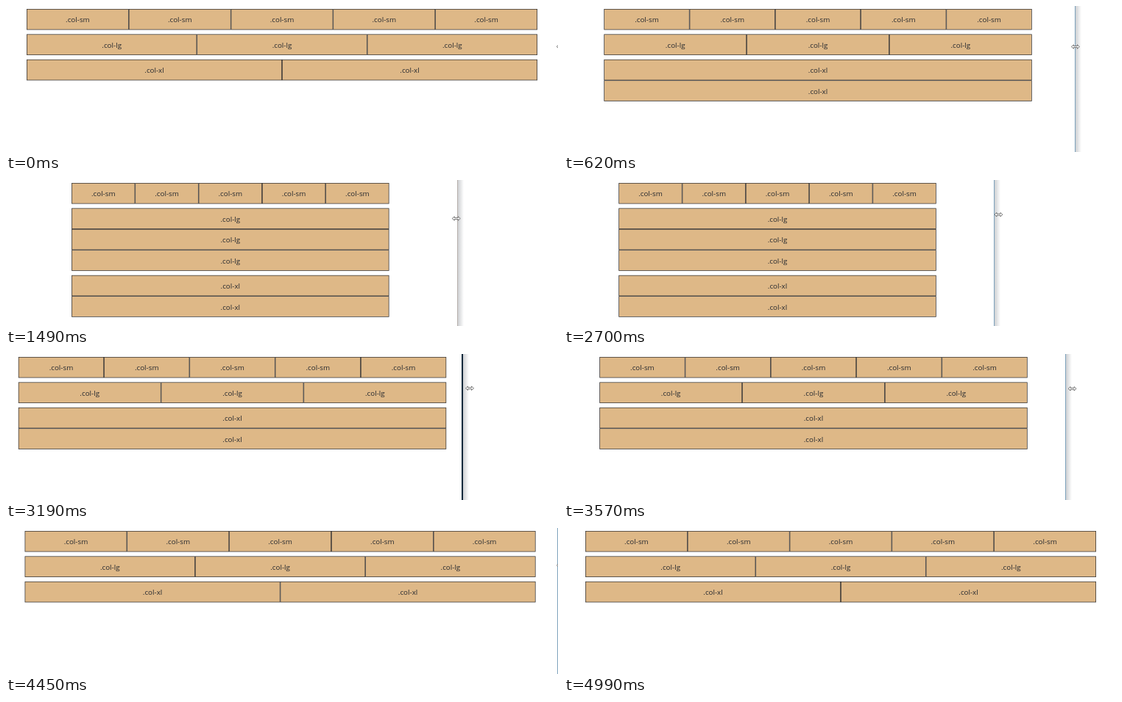
Animation, 750 px wide and 199 px high, one loop 5510 ms. Source, as an HTML page with a canvas:

```html
<!DOCTYPE html>
<html lang="en">
<head>
<meta charset="utf-8">
<title>Responsive columns</title>
<style>
html, body { margin: 0; width: 100%; height: 100%; overflow: hidden; background: #fff; }
canvas { display: block; }
</style>
</head>
<body>
<canvas id="stage" width="750" height="199"></canvas>
<script>
const ctx = document.getElementById('stage').getContext('2d');
const LOOP = 5510, STEP = 78, PAUSE = 2700, RESUME = 2791;
const ROW = 28.45, GAP = 6, BORDER = 0.7;

// Page width at the turns of the drag; ease is the ease-out power leading there.
const turns = [
  { at: 0, page: 750 },
  { at: 618, page: 690 },
  { at: 1242, page: 650 },
  { at: 1476, page: 609.6 },
  { at: 1900, page: 580, ease: 2 },
  { at: PAUSE, page: 580 },
  { at: 3181, page: 615 },
  { at: 4970, page: 752, ease: 2.5 }
];

// The drag is redrawn in steps and rests before turning back.
function snap(t) {
  const start = t < PAUSE ? -6 : RESUME;
  const stepped = start + Math.floor((t - start) / STEP) * STEP;
  return Math.max(t < PAUSE ? 0 : PAUSE, stepped);
}

function pageAt(t) {
  const i = turns.findIndex(turn => turn.at > t);
  if (i < 0) return turns[turns.length - 1].page;
  const a = turns[i - 1], b = turns[i];
  const left = (b.at - t) / (b.at - a.at);
  return b.page + (a.page - b.page) * left ** (b.ease || 1);
}

function rect(x, y, w, h, color) {
  ctx.fillStyle = color;
  ctx.fillRect(x, y, w, h);
}

function cell(label, x, y, w) {
  rect(x, y, w, ROW, '#28282b');
  rect(x + BORDER, y + BORDER, w - 2 * BORDER, ROW - 2 * BORDER, '#deb887');
  ctx.fillStyle = '#26292f';
  ctx.fillText(label, x + w / 2, y + 18.4);
}

// Draws columns side by side or stacked; returns the next top.
function group(label, count, stacked, left, width, top) {
  const w = stacked ? width : width / count;
  for (let i = 0; i < count; i++)
    cell(label, left + (stacked ? 0 : i * w), top + (stacked ? i * ROW : 0), w);
  return top + (stacked ? count : 1) * ROW + GAP;
}

// The border turns pale when pulled in fast and dark when pushed out fast.
function windowEdge(x, lead) {
  const dark = lead > 7.2;
  const width = dark ? 2 : 1;
  const color = dark ? '#10293b' : lead < -5 ? '#b9b2ae' : '#7fa3bd';
  const fade = ctx.createLinearGradient(x + width, 0, x + width + 8, 0);
  fade.addColorStop(0, 'rgba(200,202,205,0.9)');
  fade.addColorStop(1, 'rgba(200,202,205,0)');
  rect(x + width, 0, 8, 199, fade);
  rect(x, 0, width, 199, color);
}

function pointer(x, y) {
  ctx.beginPath();
  for (const side of [-1, 1])
    for (const [dx, dy] of [[2.5, 1], [2.5, 2.7], [5.5, 0], [2.5, -2.7], [2.5, -1]])
      ctx.lineTo(x + side * dx, y + side * dy);
  ctx.closePath();
  ctx.fillStyle = '#fff';
  ctx.fill();
  ctx.strokeStyle = '#555';
  ctx.lineWidth = 0.8;
  ctx.stroke();
}

function draw(t) {
  const page = pageAt(t);
  const lead = pageAt(t + 40) - page; // the pointer runs ahead of the page
  const wide = page >= 742.8, medium = page >= 612;
  const width = wide ? 694 : medium ? 581.4 : 431.4;
  const left = (page - width) / 2;

  rect(0, 0, 750, 199, '#fff');
  ctx.font = '9.8px "Open Sans", "Noto Sans", sans-serif';
  ctx.textAlign = 'center';
  let top = group('.col-sm', 5, false, left, width, 4);
  top = group('.col-lg', 3, !medium, left, width, top);
  group('.col-xl', 2, !wide, left, width, top);
  windowEdge(Math.floor(page + 4), lead);
  pointer(page + lead + 7.5, 51.2 + 4.5 * Math.cos((t - 350) / LOOP * 2 * Math.PI));
}

function tick() {
  draw(snap(performance.now() % LOOP));
  requestAnimationFrame(tick);
}
tick();
</script>
</body>
</html>
```
